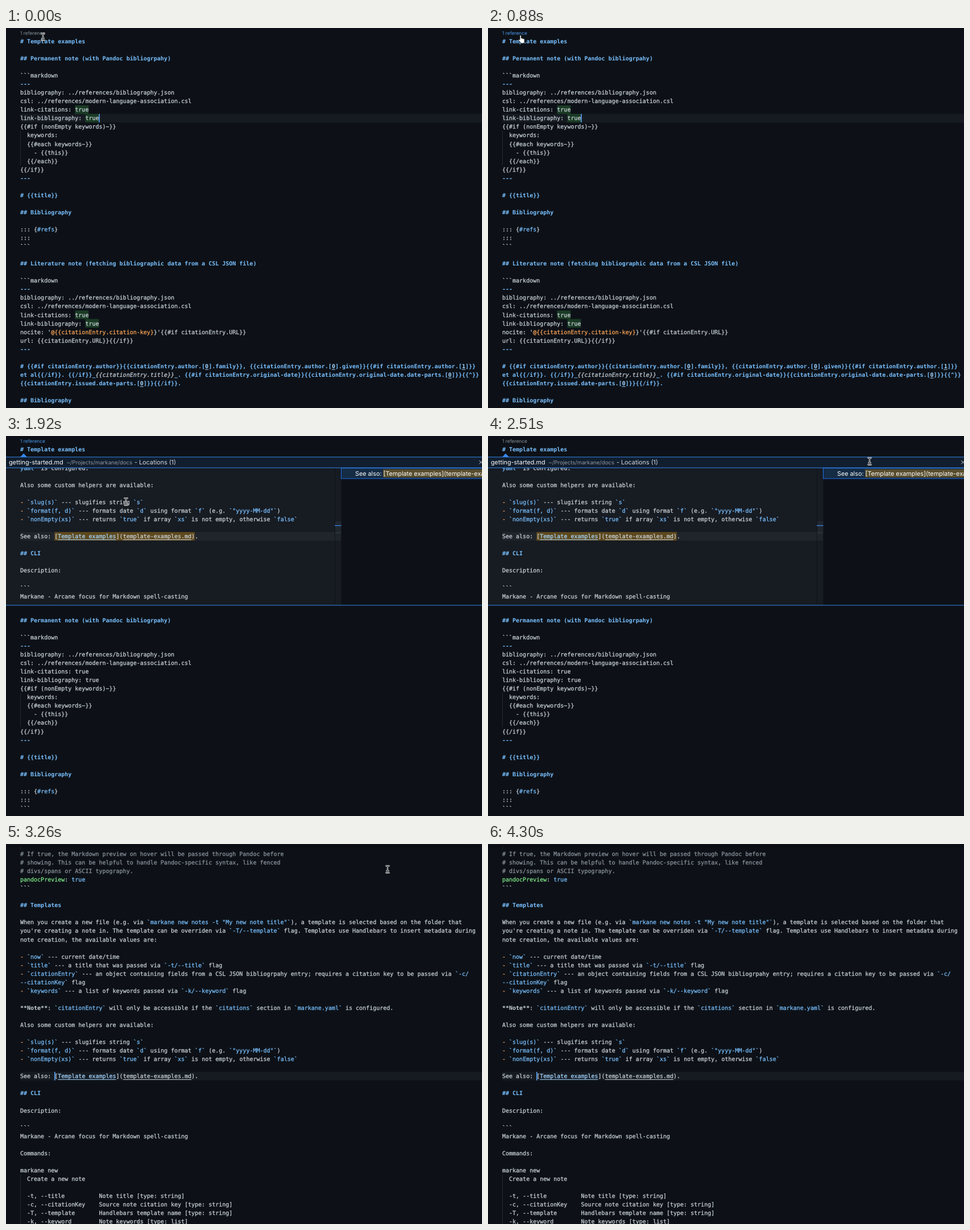
An HTML page for the animation above (4.44 s loop, 837 by 669 pixels).

```html
<!DOCTYPE html>
<html lang="en">
<head>
<meta charset="utf-8">
<title>Peek references</title>
<style>
  html, body { margin: 0; width: 100%; height: 100%; overflow: hidden; background: #0d1117; }
  svg { display: block; width: 837px; height: 669px; overflow: hidden; }
  text { white-space: pre; text-rendering: geometricPrecision; color: #c9d1d9;
         font: 10px "DejaVu Sans Mono", "Noto Sans Mono", monospace; }
  text, tspan { fill: currentColor; stroke: currentColor; stroke-width: .25px; }
  .ui, .ui tspan { font-family: Inter, "Liberation Sans", sans-serif; font-size: 10.8px; color: #fff; stroke: none; }
  .ui .path { font-size: 9.63px; color: #94989e; }
  .ui .dim { color: #d8dce1; }
  #lens { font-size: 8.4px; color: #8b949e; }
  #lens.hover { color: #4b9bf0; }
  .h, .h tspan, .v { font-weight: bold; color: #79c0ff; stroke-width: 0; }
  .b { font-weight: bold; stroke-width: 0; }
  .i { font-style: italic; }
  .c { color: #79c0ff; }
  .o { color: #ffa657; }
  .g { color: #7ee787; }
  .m { color: #8b949e; }
  .l, .v, .h .v { color: #a5d6ff; }
  .under-u { fill: #c9d1d9; }
  .under-l, .under-v { fill: #a5d6ff; }
  .line { fill: #161b22; }
  .match { fill: #bb8009; fill-opacity: .4; }
  .word { fill: #1a3b25; }
  .guide { fill: #242931; }
  .edge { fill: #3587ee; }
  .caret { fill: #58a6ff; }
</style>
</head>
<body>
<svg id="stage" viewBox="0 0 837 669"></svg>
<script>
const LOOP = 4440, LEFT = 25, CHAR = 6.02, PITCH = 15.05;
const TOP1 = 23.3, TOP2 = 17.4, PEEK_TOP = 56.2;
const PEEK_LINES = 18, PEEK_SHIFT = 385.4;

// Inline styling: «x text» wraps text in class x; u, l and v are underlined.
const examples = `# Template examples

## Permanent note (with Pandoc bibliogrpahy)

\`\`\`markdown
---
bibliography: ../references/bibliography.json
csl: ../references/modern-language-association.csl
link-citations: true
link-bibliography: true
{{#if (nonEmpty keywords)~}}
  keywords:
  {{#each keywords~}}
    - {{this}}
  {{/each}}
{{/if}}
---

# {{title}}

## Bibliography

::: {«c#refs»}
:::
\`\`\`

## Literature note (fetching bibliographic data from a CSL JSON file)

\`\`\`markdown
---
bibliography: ../references/bibliography.json
csl: ../references/modern-language-association.csl
link-citations: true
link-bibliography: true
nocite: '«o@{{citationEntry.citation-key}»}'{{#if citationEntry.URL}}
url: {{citationEntry.URL}}{{/if}}
---

# {{#if citationEntry.author}}{{citationEntry.author.[«v0»].family}}, {{citationEntry.author.[«v0»].given}}{{#if citationEntry.author.[«v1»]}}
«het al{{/if}}. {{/if}}_»«i{{citationEntry.title}}»«h_. {{#if citationEntry.original-date}}{{citationEntry.original-date.date-parts.[»«v0»«h]}}{{^}}»
«h{{citationEntry.issued.date-parts.[»«v0»«h]}}{{/if}}.»

## Bibliography`.split("\n");

const helpers = `Also some custom helpers are available:

- \`slug(s)\` --- slugifies string \`s\`
- \`format(f, d)\` --- formats date \`d\` using format \`f\` (e.g. \`"yyyy-MM-dd"\`)
- \`nonEmpty(xs)\` --- returns \`true\` if array \`xs\` is not empty, otherwise \`false\`

See also: [«lTemplate examples»](«utemplate-examples.md»).

## CLI

Description:

\`\`\`
Markane - Arcane focus for Markdown spell-casting`;

const guide = `«m# If true, the Markdown preview on hover will be passed through Pandoc before»
«m# showing. This can be helpful to handle Pandoc-specific syntax, like fenced»
«m# divs/spans or ASCII typography.»
«gpandocPreview»: «ctrue»
\`\`\`

## Templates

When you create a new file (e.g. via \`markane new notes -t "My new note title"\`), a template is selected based on the folder that
you're creating a note in. The template can be overriden via \`-T/--template\` flag. Templates use Handlebars to insert metadata during
note creation, the available values are:

- \`now\` --- current date/time
- \`title\` --- a title that was passed via \`-t/--title\` flag
- \`citationEntry\` --- an object containing fields from a CSL JSON bibliogrpahy entry; requires a citation key to be passed via «c\`-c/»
«c--citationKey\`» flag
- \`keywords\` --- a list of keywords passed via \`-k/--keyword\` flag

«b**Note**»: \`citationEntry\` will only be accessible if the \`citations\` section in \`markane.yaml\` is configured.

${helpers}

Commands:

markane new
  Create a new note

  -t, --title          Note title [type: string]
  -c, --citationKey    Source note citation key [type: string]
  -T, --template       Handlebars template name [type: string]
  -k, --keyword        Note keywords [type: list]`.split("\n");

const peekLines = ["«cyaml`» is configured.", "", ...helpers.split("\n")];

const span = (cls, s) => `<tspan class="${cls}">${s}</tspan>`;
const rect = (cls, x, y, w, h) => `<rect class="${cls}" x="${x}" y="${y}" width="${w}" height="${h}"/>`;
const rowTop = (top, row) => top + row * PITCH - PITCH / 2;
const colX = col => LEFT + col * CHAR;
const bar = (cls, top, row, col, cols) => rect(cls, colX(col), rowTop(top, row), cols * CHAR, PITCH);
const fullLine = (top, row, right) => rect("line", LEFT, rowTop(top, row), right - LEFT, PITCH);
const guideLine = (top, row, rows) => rect("guide", LEFT, rowTop(top, row), 1, rows * PITCH);
const caret = (id, top, row, col) =>
  `<g id="${id}">${rect("caret", colX(col) - .2, rowTop(top, row), 1.6, PITCH)}</g>`;

const styled = line => line
  .replace(/^- /, "«o-» ")
  .replace(/(?<!«c)`[^`«»]+`/g, "«c$&»")
  .replace(/«(\w)(.*?)»/g, (_, cls, s) => span(cls, s));

const plain = line => line.replace(/«\w|»/g, "");

function underlines(line, row, top) {
  return [...line.matchAll(/«([ulv])(.*?)»/g)].map(({ 1: cls, 2: s, index }) =>
    rect("under-" + cls, colX(plain(line.slice(0, index)).length), rowTop(top, row) + 13, s.length * CHAR, 1)
  ).join("");
}

function textLine(line, row, top) {
  if (!line) return "";
  const heading = /^(#+ |---$)/.test(line) ? "h" : "";
  return `<text class="${heading}" x="${LEFT}" y="${top + row * PITCH + 3.6}">${styled(line)}</text>`
    + underlines(line, row, top);
}

const block = (lines, top, first = 0) =>
  lines.map((line, i) => textLine(line, i + first, top)).join("");

const words = [[8, 16], [9, 19], [32, 16], [33, 19]]
  .map(([row, col]) => bar("word", TOP1, row, col, 4)).join("");

const peek = `
  <rect x="0" y="37" width="837" height="261" fill="#0d1117"/>
  <rect x="0" y="37" width="589.5" height="261" fill="#171b22"/>
  <rect x="${LEFT}" y="${rowTop(PEEK_TOP, 8)}" width="564" height="${PITCH}" fill="#20252c"/>
  ${bar("match", PEEK_TOP, 8, 10, 41)}
  ${block(peekLines, PEEK_TOP)}
  <rect x="578" y="56" width="1" height="242" fill="#0d1117" opacity=".7"/>
  <rect x="579" y="150" width="10.5" height="22" fill="#6e7681" opacity=".12"/>
  ${rect("edge", 578, 157, 11.5, 1.3)}
  <rect x="589.5" y="56.5" width="260" height="18.5" fill="#152c45" stroke="#1f6feb"/>
  ${rect("match", 663, 58.5, 180, 14.5)}
  <text class="ui" x="614" y="70">See also: </text>
  <text class="ui" x="663.5" y="70">[Template examples](template-examples.md).</text>
  <rect x="0" y="37" width="837" height="19" fill="#111e2e"/>
  <text class="ui" x="5" y="50.3">getting-started.md</text>
  <text class="ui" x="106.5" y="50.3">${span("path", "~/Projects/markane/docs")}</text>
  <text class="ui" x="226" y="50.3">${span("dim", "- Locations (1)")}</text>
  <path d="M832 43l6.5 6.5m0-6.5l-6.5 6.5" stroke="#c9d1d9" fill="none"/>
  ${rect("edge", 0, 36.5, 837, 1)}
  ${rect("edge", 0, 55.5, 837, 1)}
  ${rect("edge", 0, 297.5, 837, 1)}`;

const beam = "M-2.5-6Q0-6 0-4.4Q0-6 2.5-6M0-4.5V4.5M-2.5 6Q0 6 0 4.4Q0 6 2.5 6M-1.5 2.4H1.5";

document.getElementById("stage").innerHTML = `
  <defs><linearGradient id="shade" x2="0" y2="1">
    <stop stop-color="#000" stop-opacity=".35"/><stop offset="1" stop-color="#000" stop-opacity="0"/>
  </linearGradient></defs>
  <rect width="837" height="669" fill="#0d1117"/>
  <g id="examples">
    <text class="ui" id="lens" x="25" y="12.4">1 reference</text>
    ${block(examples.slice(0, 1), TOP1)}
    <g id="marks">${fullLine(TOP1, 9, 837)}${words}</g>
    <g id="rest">${guideLine(TOP1, 11, 4)}${block(examples.slice(1), TOP1, 1)}</g>
    ${caret("caret1", TOP1, 9, 23)}
  </g>
  <g id="guide">
    ${fullLine(TOP2, 26, 837)}
    ${rect("guide", LEFT, 3, 1, 7)}${guideLine(TOP2, 38, 6)}
    ${block(guide, TOP2)}
    <rect y="3" width="837" height="5" fill="url(#shade)"/>
    ${caret("caret2", TOP2, 26, 10)}
  </g>
  <g id="peek">${peek}<path id="notch" class="edge" d="M-6 37L0 30.7L6 37z"/></g>
  <g id="beam" fill="none" stroke-linecap="round">
    <path d="${beam}" stroke="#fff" stroke-width="2.4"/><path d="${beam}" stroke="#111" stroke-width=".9"/>
  </g>
  <path id="hand" fill="#fff" stroke="#111" stroke-width=".8" stroke-linejoin="round"
    d="M3 9V2q0-1.3 1.2-1.3T5.4 2v4q1.8-.6 2.2.5 1.6-.4 2 .7 1.4-.1 1.4 1.3v3q0 1.5-.7 2.5v1H4.5v-1L1 9.8q-.8-1.2.2-1.6t1.8.8z"/>
  <path id="arrow" fill="#111" stroke="#fff" stroke-linejoin="round" d="M0 0V14l3.3-3 2 5 2.2-.9-2-4.8H10z"/>`;

const $ = id => document.getElementById(id);
const show = (id, on) => $(id).style.display = on ? "" : "none";
const move = (id, x, y) => $(id).setAttribute("transform", `translate(${x} ${y})`);

const pointer = [
  [0, "beam", 65, 15.5], [150, "hand", 53, 12], [1620, "hand", 53.5, 12.3],
  [1920, "beam", 211, 115.5], [2070, "arrow", 668, 41.5], [2510, "beam", 671, 44.5],
  [3560, "beam", 663, 57.5], [3700, "beam", 795, 609.5], [3850, "", 0, 0]
];

function render(t) {
  const within = (from, to) => t >= from && t < to;
  const inGuide = t >= 2660, peeking = within(1030, 3260);

  show("examples", !inGuide);
  show("guide", inGuide);
  show("marks", !peeking);
  show("peek", peeking);
  show("caret1", !peeking && !within(440, 880));
  show("caret2", !peeking && !within(3850, 4300));
  $("lens").classList.toggle("hover", within(290, 2070));
  move("rest", 0, peeking ? PEEK_LINES * PITCH : 0);
  move("peek", 0, inGuide ? PEEK_SHIFT : 0);
  move("notch", inGuide ? 85.3 : 31, 0);

  const [, shape, x, y] = pointer.findLast(([from]) => t >= from);
  for (const id of ["beam", "hand", "arrow"]) show(id, id === shape);
  if (shape) move(shape, x, y);
}

const start = performance.now();
function tick() {
  render((performance.now() - start) % LOOP);
  requestAnimationFrame(tick);
}
tick();
</script>
</body>
</html>
```
